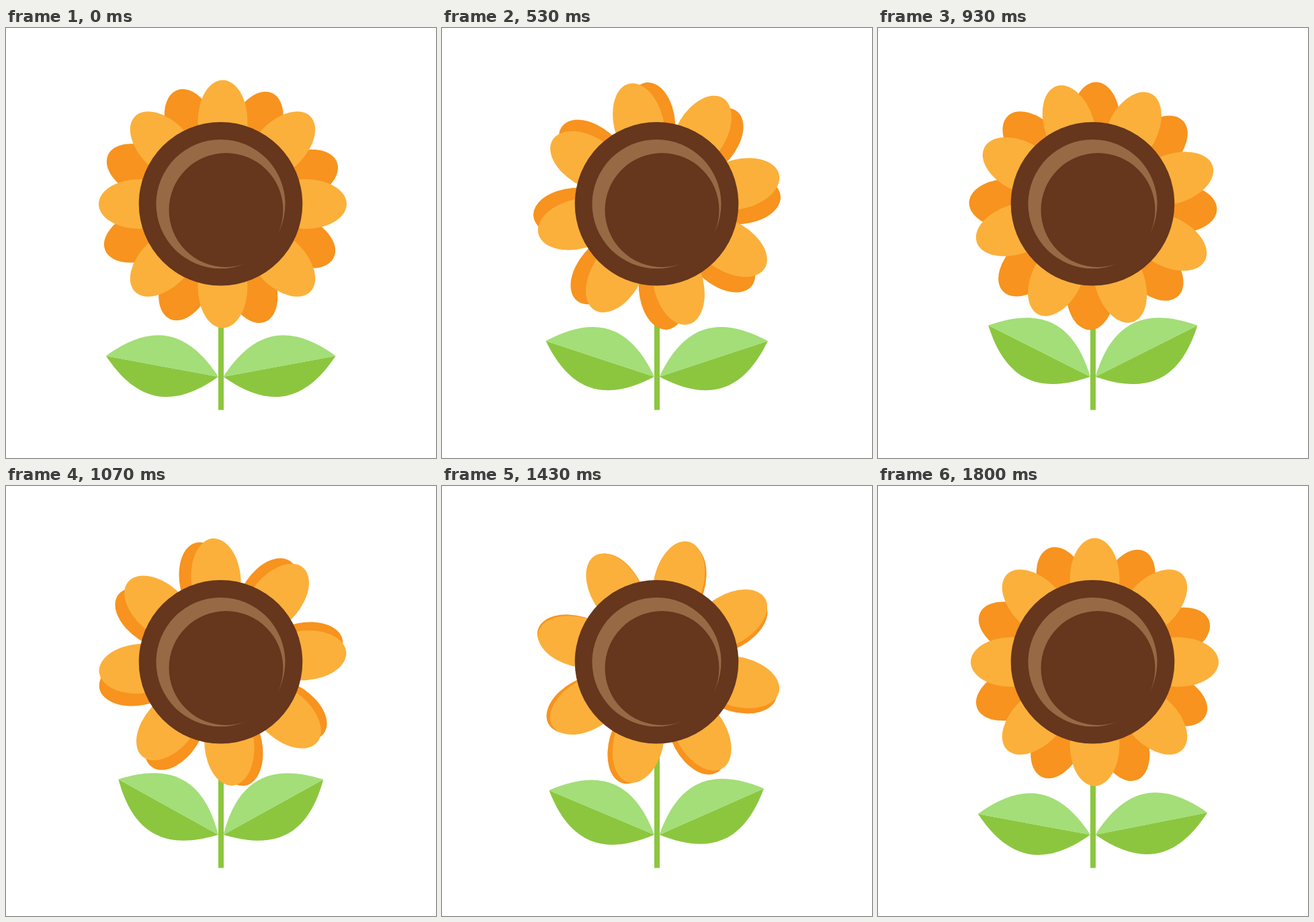
Write an HTML page that moves like this. It is 640 px wide and 640 px high and loops after 1830 ms.

```html
<!DOCTYPE html>
<html lang="en">
<head>
<meta charset="utf-8">
<title>Sunflower</title>
<style>
  html, body { margin: 0; width: 100%; height: 100%; overflow: hidden; background: #fff; }
  svg { display: block; width: 100vw; height: 100vh; }
</style>
</head>
<body>
<svg viewBox="0 0 640 640">
  <rect x="316" y="380" width="8" height="188.5" fill="#8cc63f"/>
  <g id="leaves"></g>
  <g id="back" fill="#f7931e"></g>
  <g id="front" fill="#fbb03b"></g>
  <circle cx="319.5" cy="261.7" r="121.8" fill="#66361d"/>
  <circle cx="319.5" cy="262" r="96" fill="#976a45"/>
  <circle cx="327.5" cy="271" r="85" fill="#66361d"/>
</svg>
<script>
const LOOP = 1830;

// time, front turn, back turn, left leaf lift, right leaf lift (degrees)
const KEYS = [
  [0, 0, 0, 0, 0],
  [330, 14.3, 12.3, 3.1, 3.1],
  [530, 31, 28.8, 7.7, 7.7],
  [770, 55.3, 51.5, 13.2, 13.2],
  [1070, 85.3, 80.6, 18.5, 18.4],
  [1190, 90, 86, 19.8, 19.8],
  [1430, 59.2, 53.3, 12.4, 13.4],
  [1800, 0, 0, 0, 0.7],
];
const PEAK = 5;

const byId = id => document.getElementById(id);

function add(parent, tag, attrs) {
  const el = document.createElementNS("http://www.w3.org/2000/svg", tag);
  for (const name in attrs) el.setAttribute(name, attrs[name]);
  return parent.appendChild(el);
}

function addPetals(group) {
  for (let i = 0; i < 8; i++) {
    add(group, "ellipse", { cy: -123, rx: 37, ry: 61.5, transform: `rotate(${i * 45})` });
  }
}

// A leaf lies along the negative x axis, with its base at the origin.
function addLeaf() {
  const leaf = add(byId("leaves"), "g", {});
  const half = h => `M0 0C-58 ${h} -112 ${h} -170 0Z`;
  add(leaf, "path", { d: half(60), fill: "#8cc63f" });
  add(leaf, "path", { d: half(-61), fill: "#a3de78" });
  return leaf;
}

function slope(i, col) {
  if (i === 0 || i === PEAK || i === KEYS.length - 1) return 0;
  const a = KEYS[i - 1], b = KEYS[i + 1];
  return (b[col] - a[col]) / (b[0] - a[0]);
}

// Smooth curve through the keys, at rest at both ends and at the peak.
function valueAt(t, col) {
  const last = KEYS.length - 1;
  if (t >= KEYS[last][0]) return KEYS[last][col];
  let i = 0;
  while (t >= KEYS[i + 1][0]) i++;
  const a = KEYS[i], b = KEYS[i + 1];
  const span = b[0] - a[0];
  const u = (t - a[0]) / span, v = 1 - u;
  return a[col] * v * v * (1 + 2 * u) + b[col] * u * u * (3 - 2 * u)
    + span * u * v * (slope(i, col) * v - slope(i + 1, col) * u);
}

const front = byId("front"), back = byId("back");
addPetals(front);
addPetals(back);
const left = addLeaf(), right = addLeaf();

function place(el, x, y, angle, flip = "") {
  el.setAttribute("transform", `translate(${x} ${y}) ${flip} rotate(${angle})`);
}

function draw(t) {
  place(front, 322.5, 262, valueAt(t, 1));
  place(back, 320, 265, 24.3 - valueAt(t, 2));
  place(left, 316, 519, 10.5 + valueAt(t, 3));
  place(right, 323.5, 519, 10.5 + valueAt(t, 4), "scale(-1 1)");
}

const start = performance.now();
function tick() {
  draw((performance.now() - start) % LOOP);
  requestAnimationFrame(tick);
}
tick();
</script>
</body>
</html>
```
